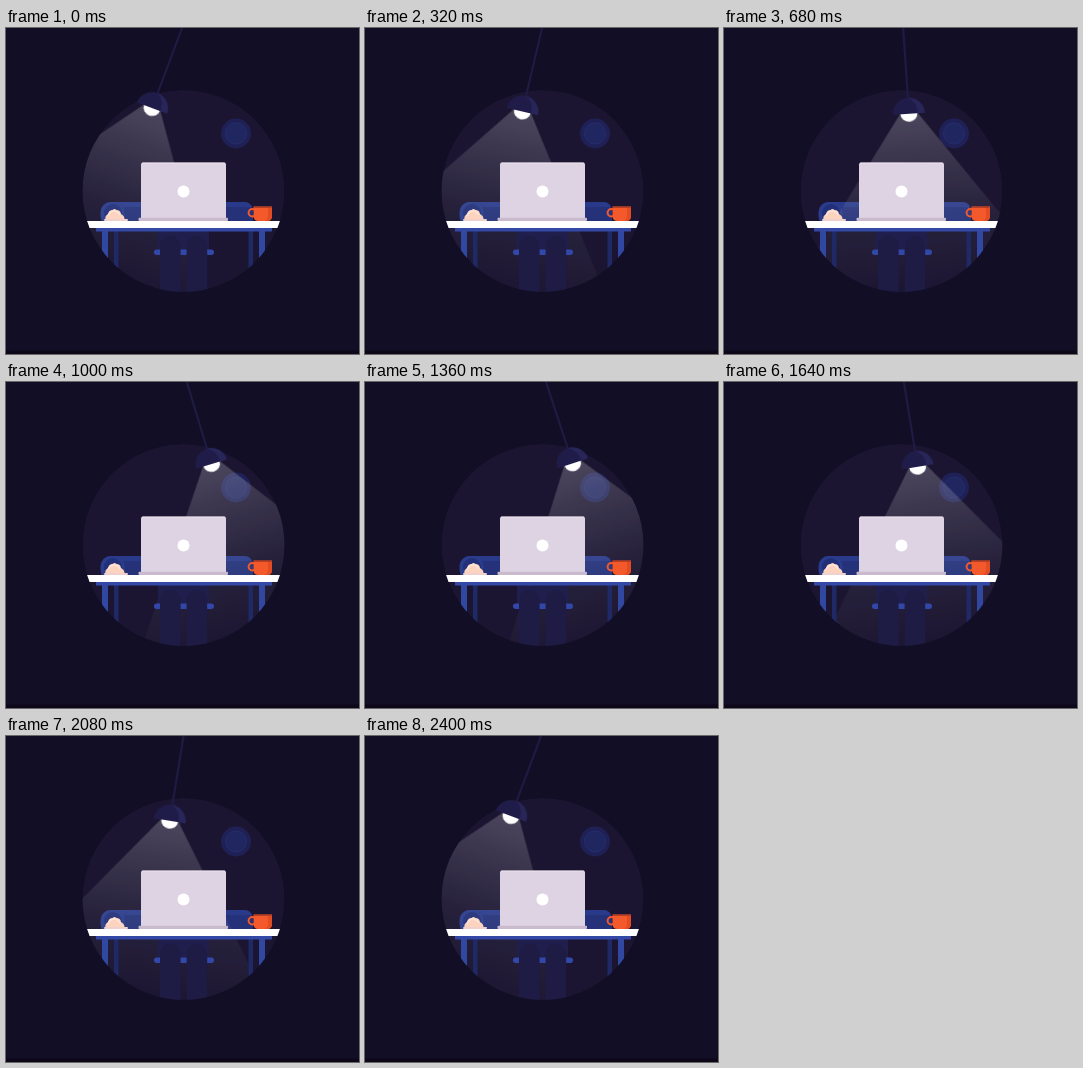
Animation, 353 px wide and 326 px high, one loop 2440 ms. Source, as an HTML page:

```html
<!DOCTYPE html>
<html lang="en">
<head>
<meta charset="utf-8">
<title>Night desk</title>
<style>
  html, body { margin: 0; width: 100%; height: 100%; overflow: hidden; background: #110e26; }
  svg { display: block; width: 100vw; height: 100vh; }
</style>
</head>
<body>
<svg viewBox="0 0 353 326">
  <defs>
    <clipPath id="room"><circle cx="177.5" cy="163" r="101"/></clipPath>
    <linearGradient id="light" gradientUnits="userSpaceOnUse" x1="0" y1="93" x2="0" y2="275">
      <stop offset="0" stop-color="#fff" stop-opacity=".21"/>
      <stop offset=".25" stop-color="#fff" stop-opacity=".135"/>
      <stop offset=".58" stop-color="#fff" stop-opacity=".05"/>
      <stop offset="1" stop-color="#fff" stop-opacity="0"/>
    </linearGradient>
  </defs>
  <rect width="353" height="326" fill="#110e26"/>
  <rect y="322.5" width="353" height="3.5" fill="#0d0719"/>

  <g clip-path="url(#room)">
    <circle cx="177.5" cy="163" r="101" fill="#1b1531"/>

    <!-- clock -->
    <circle cx="230" cy="105.5" r="15" fill="#1f2156"/>
    <circle cx="230" cy="105.5" r="10.5" fill="#20265f" stroke="#252d6b"/>

    <!-- sofa -->
    <rect x="96" y="174" width="151" height="28" rx="9" fill="#25327a"/>
    <path d="M105 174H238q6 0 8 5H105z" fill="#2a3a8b"/>
    <rect x="94.5" y="174" width="24" height="24" rx="10" fill="#2a3c8c"/>
    <circle cx="107" cy="185" r="9" fill="#22307a"/>

    <!-- beam -->
    <g transform="translate(178.7 -7)">
      <path class="swing" d="M-9 93H9L166 313H-166z" fill="url(#light)"/>
    </g>

    <!-- chair and legs -->
    <rect x="152" y="202" width="51" height="20" fill="#1f1e4c"/>
    <rect x="148" y="221.5" width="60" height="5.5" rx="2.7" fill="#3248a8"/>
    <path d="M154 266V218a10.3 10.3 0 0 1 20.6 0V266zM180.6 266V218a10.3 10.3 0 0 1 20.6 0V266z" fill="#1e1b45"/>

    <!-- table -->
    <path d="M108 203h4.5v60H108zM242.500 203h4.500v60h-4.500z" fill="#1f2966"/>
    <path d="M96 203h6v60h-6zM253 203h6v60h-6z" fill="#3148a2"/>
    <rect x="90" y="199" width="176" height="4.500" fill="#3449a6"/>
    <rect x="76" y="193" width="203" height="7" fill="#fff"/>
  </g>

  <!-- laptop -->
  <rect x="135" y="134.500" width="85" height="57" rx="2" fill="#ded3e2"/>
  <path d="M136 135.200H219" stroke="#e9e0ec"/>
  <rect x="132.500" y="189.700" width="89.500" height="3.300" rx="1" fill="#c9bacd"/>
  <circle cx="177.500" cy="163.500" r="6" fill="#fff"/>

  <!-- snack -->
  <path d="M99.500 192q-1-4 2.500-6 1-4 4.500-4 2-2 4 0 4 0 4.500 4 4 2 3.500 6z" fill="#fbd3bf"/>
  <path d="M102 188q2-5 6-5 4 0 6 4" fill="none" stroke="#ffe6d8" stroke-width="1.500"/>
  <rect x="98" y="191" width="24" height="2" rx="1" fill="#efd0cd"/>

  <!-- mug -->
  <circle cx="246.300" cy="184.800" r="3.700" fill="none" stroke="#f2592c" stroke-width="2"/>
  <path d="M247.500 178.500H266V188q0 5-5 5h-8.500q-5 0-5-5z" fill="#f4592b"/>
  <path d="M262 179h4V188q0 5-5 5h-3q4-1 4-5z" fill="#e24c23"/>
  <path d="M248 179.200h17.500" stroke="#a83a22" stroke-width="1.200"/>

  <!-- lamp -->
  <g transform="translate(178.7 -7)">
    <g class="swing">
      <path d="M0 0V79" stroke="#201c49" stroke-width="1.800"/>
      <path d="M-8.500 92.500a8.500 8.500 0 0 0 17 0z" fill="#fff"/>
      <path d="M-16 93a16 16 0 0 1 32 0z" fill="#201c49"/>
      <path d="M0 77a16 16 0 0 1 16 16H9Q9 82 0 77z" fill="#282559"/>
    </g>
  </g>
</svg>
<script>
  // [ms, degrees to the right of vertical]
  const keys = [
    [0, -20.6], [320, -13.3], [680, 3.8], [1000, 16.8], [1225, 19.8],
    [1640, 9.3], [2080, -9.2], [2240, -16.3], [2400, -20.6]
  ];
  const LOOP = 2440, STEP = 40, TURN = [0, 4, keys.length - 1];

  const slope = i => {
    if (TURN.includes(i)) return 0;
    const [a, b] = [keys[i - 1], keys[i + 1]];
    return (b[1] - a[1]) / (b[0] - a[0]);
  };

  // Smooth curve through the keys, at rest at each turning point
  function angle(t) {
    if (t >= 2400) return keys[8][1];
    const i = keys.findIndex(k => k[0] > t) - 1;
    const [t0, a0] = keys[i], [t1, a1] = keys[i + 1];
    const d = t1 - t0, u = (t - t0) / d, v = 1 - u;
    return a0 * (1 + 2 * u) * v * v + a1 * u * u * (3 - 2 * u)
      + d * u * v * (slope(i) * v - slope(i + 1) * u);
  }

  const frames = [];
  for (let t = 0; t <= LOOP; t += STEP) {
    frames.push({ offset: t / LOOP, transform: `rotate(${-angle(t)}deg)` });
  }
  for (const el of document.querySelectorAll('.swing')) {
    el.style.transformOrigin = '0 0';
    el.animate(frames, { duration: LOOP, iterations: Infinity });
  }
</script>
</body>
</html>
```
